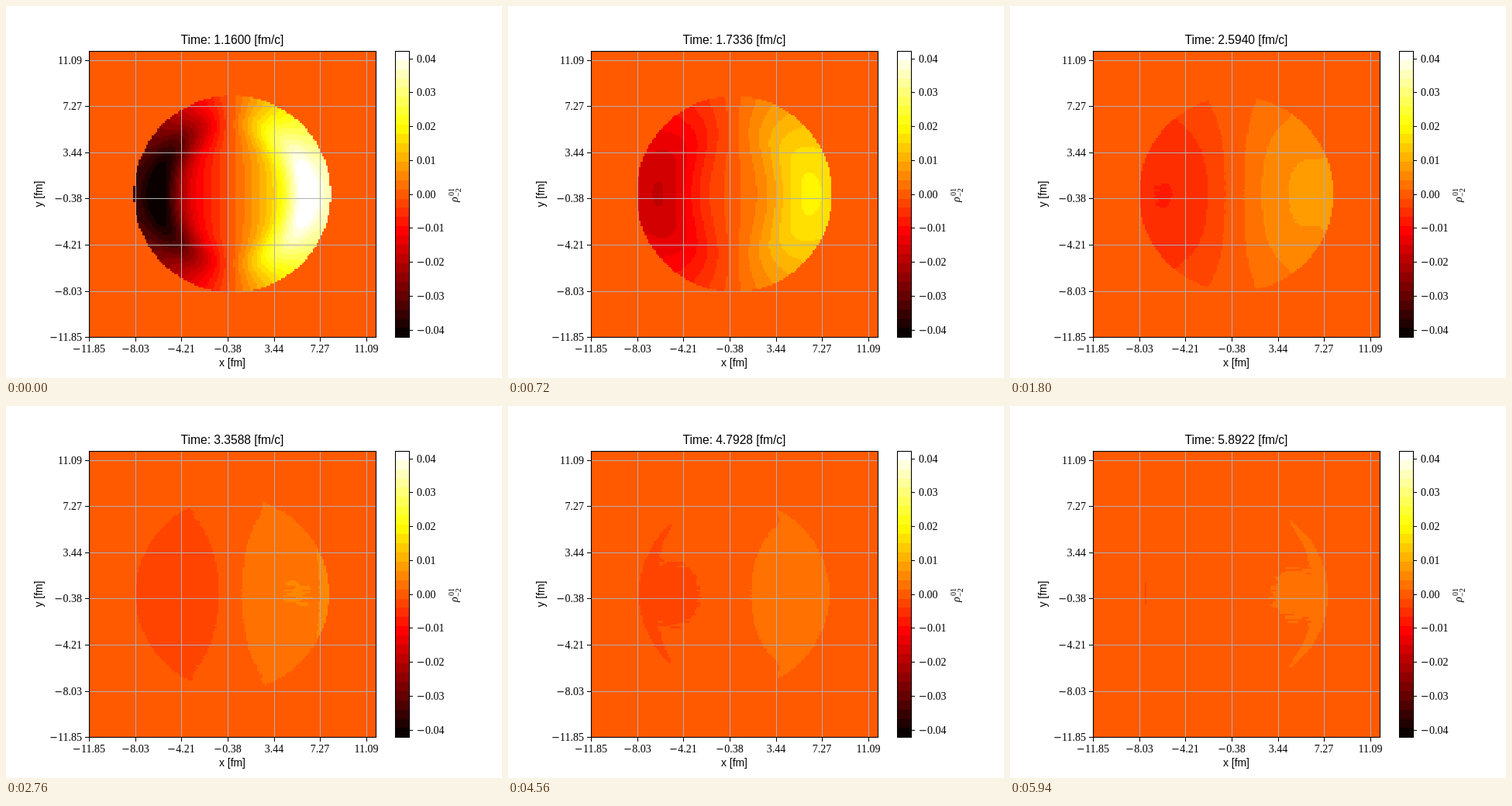
Animation of 640 by 480 pixels, one loop 6000 ms. Source, as an HTML page with a canvas:

```html
<!DOCTYPE html>
<html lang="en">
<head>
<meta charset="utf-8">
<title>Field evolution</title>
<style>
html, body { margin: 0; width: 100%; height: 100%; overflow: hidden; background: #fff; }
canvas { display: block; }
</style>
</head>
<body>
<canvas id="stage" width="640" height="480"></canvas>
<script>
const ctx = document.getElementById('stage').getContext('2d');
const STEPS = 100, STEP_MS = 60;
const LEFT = 107, TOP = 58, CELLS = 155, CELL = 370 / CELLS;
const HALF = 15, BAND = 0.0845 / 31;      // colour levels run from -HALF to HALF
const TICK = 59.61;
const SERIF = '14px "Liberation Serif", serif';
const SANS = '"Liberation Sans", Arial, sans-serif';
const TICKS = ['-11.85', '-8.03', '-4.21', '-0.38', '3.44', '7.27', '11.09'];

const clamp = (v, lo, hi) => Math.min(hi, Math.max(lo, v));
const gauss = z => Math.exp(-z * z / 2);

// "hot" colour map
function hot(level) {
  const x = (level + HALF) / (2 * HALF);
  const channel = v => Math.round(255 * clamp(v, 0, 1));
  return `rgb(${channel(0.0416 + x * 2.6249)},${channel((x - 0.365079) / 0.380953)},${channel((x - 0.746032) / 0.253968)})`;
}
const palette = Array.from({ length: 2 * HALF + 1 }, (_, i) => hot(i - HALF));

// Density at pixel offset (x, y) from the centre, as a function of time
function makeField(t) {
  const age = t - 1.16, late = t - 3.36;
  const radius = 126.9 - 0.95 * age - 1.2 * Math.max(0, t - 4) ** 2;
  const peak = 0.0425 * (t / 1.16) ** -2.2 + 0.0002;
  const m = clamp((t - 1.9) / 1.3, 0, 1), mix = m * m * (3 - 2 * m);
  const ridge = 93 - 9 * age, sigma = 16 + 13.5 * Math.sqrt(age);
  const plateau = Math.max(0.83, 0.91 - 0.06 * late);
  const knee = 37 - 6.3 * late, rim = Math.max(0, 0.1 * (t - 2));

  return (x, y) => {
    const r = Math.hypot(x, y);
    if (r > radius) return 0;
    const cos = r ? x / r : 0;
    const early = 0.0062 * x + 0.45 * gauss((r - ridge) / sigma) * cos;
    const s = x / (knee * (1 + (y / 95) ** 2));
    const flat = plateau * s / (1 + s ** 4) ** 0.25
      * (1 - 0.5 * (y / 125) ** 2) * (1 - 0.12 * ((Math.abs(x) - 75) / 60) ** 2)
      + rim * gauss((radius - r) / 7) * cos
      + 0.012 * Math.sin(y * 0.71 + 2 * Math.sin(y * 0.19)) * Math.sin(x * 0.11);
    return peak * (early + (flat - early) * mix) + 0.00025;
  };
}

function rect(color, x, y, w, h) {
  ctx.fillStyle = color;
  ctx.fillRect(x, y, w, h);
}

function frame(x0, y0, x1, y1) {
  ctx.strokeStyle = '#000';
  ctx.lineWidth = 1.1;
  ctx.strokeRect(x0 + 0.5, y0 + 0.5, x1 - x0, y1 - y0);
}

function text(str, x, y, font, align = 'left') {
  ctx.font = font;
  ctx.textAlign = align;
  ctx.fillStyle = '#000';
  ctx.fillText(str, x, y);
}

// Number with a wide mathematical minus; align: 0 left, 0.5 centre, 1 right
function number(str, x, y, align) {
  const minusFont = '13px "DejaVu Sans", sans-serif';
  const digits = str.replace('-', '');
  ctx.font = SERIF;
  let width = ctx.measureText(digits).width, minus = 0;
  if (digits !== str) {
    ctx.font = minusFont;
    minus = ctx.measureText('−').width;
  }
  x -= (width + minus) * align;
  if (minus) text('−', x, y, minusFont);
  text(digits, x + minus, y, SERIF);
}

function rotated(x, y, draw) {
  ctx.save();
  ctx.translate(x, y);
  ctx.rotate(-Math.PI / 2);
  draw();
  ctx.restore();
}

function drawField(t) {
  rect(palette[HALF], LEFT, TOP, 370, 370);
  const field = makeField(t), mid = (CELLS - 1) / 2;
  const edgeX = i => Math.round(LEFT + i * CELL), edgeY = j => Math.round(TOP - 0.5 + j * CELL);
  for (let j = 20; j < CELLS - 20; j++) {
    for (let i = 20; i < CELLS - 20; i++) {
      const level = clamp(Math.round(field((i - mid) * CELL, (j - mid) * CELL) / BAND), -HALF, HALF);
      if (level) rect(palette[level + HALF], edgeX(i), edgeY(j), edgeX(i + 1) - edgeX(i), edgeY(j + 1) - edgeY(j));
    }
  }
}

function drawAxes() {
  TICKS.forEach((label, k) => {
    const x = Math.round(107.2 + TICK * k), y = Math.round(427.2 - TICK * k);
    if (k) {
      rect('#b0b0b0', x, TOP, 1, 370);
      rect('#b0b0b0', LEFT, y, 370, 1);
    }
    rect('#000', x, 428, 1, 5);
    rect('#000', 102, y, 5, 1);
    number(label, x, 447, 0.5);
    number(label, 98, y + 4.5, 1);
  });
  frame(LEFT, TOP, 477, 427);
  text('x [fm]', 292, 465, '13.9px ' + SANS, 'center');
  rotated(47, 242.5, () => text('y [fm]', 0, 0, '13.9px ' + SANS, 'center'));
}

function drawColorbar() {
  const edge = k => Math.round(427.4 - k * 369.6 / 31);
  palette.forEach((color, k) => rect(color, 502, edge(k + 1), 18, edge(k) - edge(k + 1)));
  frame(502, TOP, 520, 427);
  for (let k = -4; k <= 4; k++) {
    const y = Math.round(242.6 - k * 43.75);
    rect('#000', 521, y, 4, 1);
    number((k / 100).toFixed(2), 530, y + 4.5, 0);
  }
  rotated(583, 253, () => {
    text('ρ', 0, 0, 'italic 14px "Liberation Serif", serif');
    text('01', 8, -5, '10px "Liberation Serif", serif');
    text('−2', 7, 4, '10px "Liberation Serif", serif');
  });
}

function draw(step) {
  const t = 1.16 + step * 0.0478;
  rect('#fff', 0, 0, 640, 480);
  drawField(t);
  drawAxes();
  drawColorbar();
  text(`Time: ${t.toFixed(4)} [fm/c]`, 292, 49, '15.6px ' + SANS, 'center');
}

let shown = -1;
const start = performance.now();
function tick() {
  const step = Math.floor((performance.now() - start) / STEP_MS) % STEPS;
  if (step !== shown) draw(shown = step);
  requestAnimationFrame(tick);
}
tick();
</script>
</body>
</html>
```
